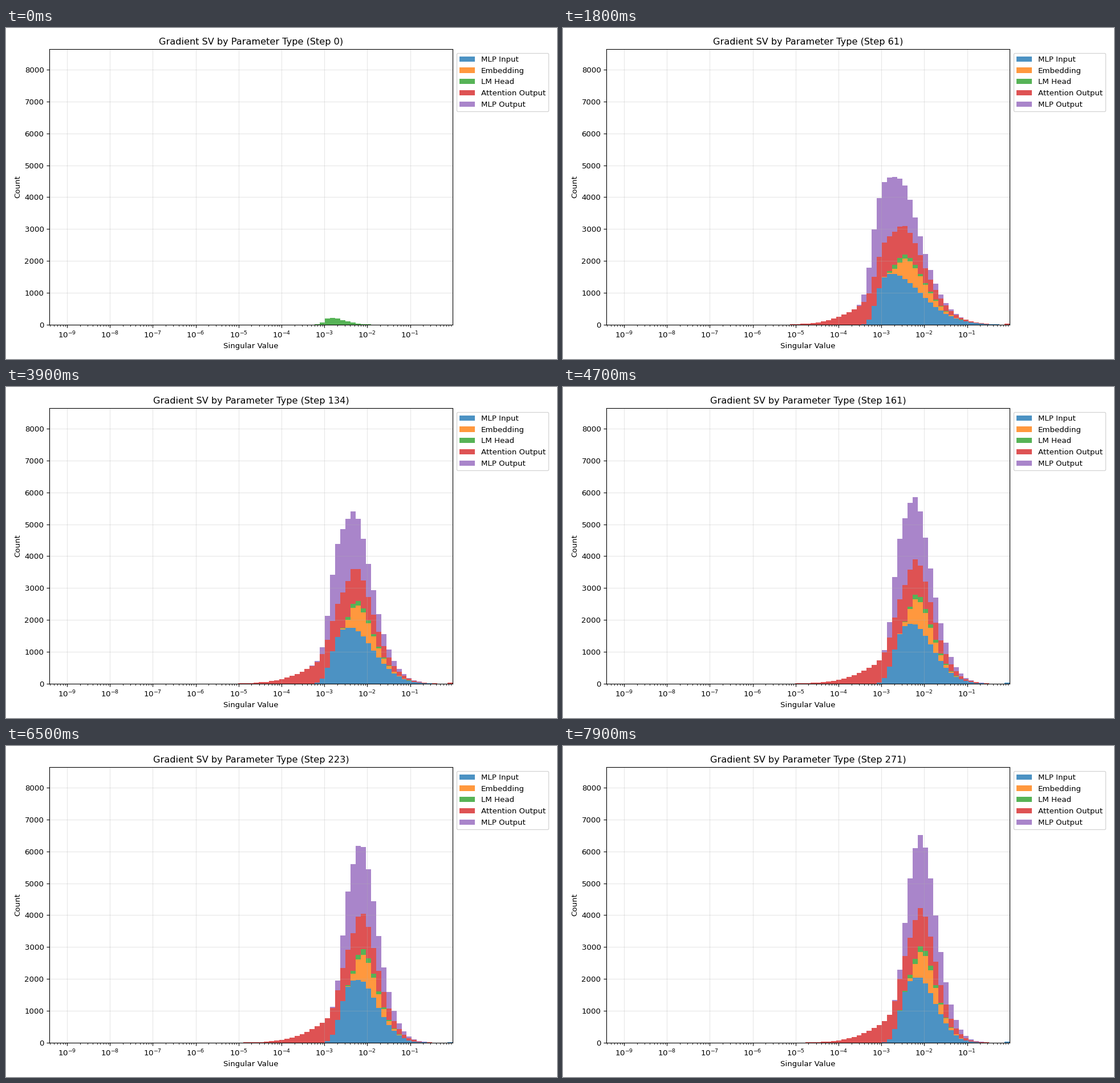
Recreate the animation shown at these times as a matplotlib script. Size 966x580 px, loop 8000 ms.

```python
import numpy as np
import matplotlib.pyplot as plt
from matplotlib.animation import FuncAnimation

W, H, DPI = 966, 580, 100
SCALE = 0.966  # a 10 x 6 inch layout, shrunk to the stage
FRAMES, INTERVAL = 80, 100
STEPS_PER_FRAME = 3.436
BINS = 79
RIGHT_POWER = 1.8
EARLY_DRIFT = 3.65  # bins per e-fold of time while the gradients first grow

plt.rcParams.update({
    "font.size": 10 * SCALE,
    "axes.titlepad": 6 * SCALE,
    "axes.labelpad": 4 * SCALE,
    "xtick.major.size": 3.5 * SCALE,
    "ytick.major.size": 3.5 * SCALE,
    "xtick.major.pad": 3.5 * SCALE,
    "ytick.major.pad": 3.5 * SCALE,
})


class Layer:
    """A lopsided bell: peak bin, height and the two widths follow key times."""

    def __init__(self, label, color, left_power, peak, height, left, right,
                 times=(8, 18, 31, 47, 79)):
        self.label, self.color, self.left_power = label, color, left_power
        self.times = times
        self.params = peak, height, left, right

    def counts(self, i):
        first = self.times[0]
        if i == 0 < first:
            return np.zeros(BINS)
        peak, height, left, right = (np.interp(i, self.times, p) for p in self.params)
        if i < first:
            peak += EARLY_DRIFT * np.log(i / first)
        d = np.arange(BINS) - peak
        fall = np.where(d < 0, np.abs(d / left) ** self.left_power,
                        np.abs(d / right) ** RIGHT_POWER)
        return np.round(height * np.exp(-fall))


LAYERS = [
    Layer("MLP Input", "tab:blue", 3.3,
          peak=(53.4, 55.6, 57.6, 59.6, 60.7),
          height=(1550, 1600, 1650, 1880, 2050),
          left=(4.7, 3.6, 4.3, 4.3, 4.1),
          right=(7.2, 8.2, 7.1, 5.5, 4.75)),
    Layer("Embedding", "tab:orange", 2.6,
          peak=(57, 58.8, 59.7, 60.8, 61.7),
          height=(430, 680, 775, 845, 870),
          left=(5, 2.4, 2, 2.2, 1.95),
          right=(6.1, 4.6, 4, 3.3, 3.2)),
    Layer("LM Head", "tab:green", 2.6, times=(0, 8, 18, 31, 47, 79),
          peak=(54.8, 55, 56.8, 59, 60.5, 61.2),
          height=(215, 152, 140, 132, 153, 180),
          left=(1.8, 2.2, 2, 2.6, 1.7, 2.7),
          right=(3.8, 4.5, 5.6, 4, 4.4, 3.5)),
    Layer("Attention Output", "tab:red", 1.7,
          peak=(51.5, 54.8, 57, 58.8, 60.3),
          height=(1130, 1085, 1095, 1165, 1220),
          left=(7.5, 7.8, 8.4, 8.6, 8.4),
          right=(7.45, 8, 7, 6.1, 5.4)),
    Layer("MLP Output", "tab:purple", 3.3,
          peak=(52.2, 54.2, 56.3, 58.7, 61),
          height=(1890, 1900, 1870, 2110, 2300),
          left=(3.7, 3.35, 3.75, 3.3, 3.2),
          right=(5.95, 6.3, 6, 5.3, 4.55)),
]


def all_counts(i):
    counts = np.array([layer.counts(i) for layer in LAYERS])
    if i > 0:  # a few outliers gather in the last bin
        rng = np.random.default_rng(i)
        counts[rng.choice([0, 1, 3]), -1] += rng.integers(12, 40)
    return counts


fig = plt.figure(figsize=(W / DPI, H / DPI), dpi=DPI)
ax = fig.add_axes([76 / W, 60 / H, 707 / W, 483 / H])
edges = np.logspace(-9.412, -0.0093, BINS + 1)
flat = np.zeros(BINS)
stacks = [ax.stairs(flat, edges, baseline=flat, fill=True, color=layer.color,
                    alpha=0.8, label=layer.label)
          for layer in LAYERS]
ax.set_xscale("log")
ax.set_xlim(edges[0], edges[-1])
ax.set_ylim(0, 8644)
ax.set_xlabel("Singular Value")
ax.set_ylabel("Count")
ax.grid(True, alpha=0.3)
ax.legend(loc="upper left", bbox_to_anchor=(1, 1))
title = ax.set_title("")


def update(i):
    base = np.zeros(BINS)
    for patch, counts in zip(stacks, all_counts(i)):
        top = base + counts
        patch.set_data(values=top, baseline=base)
        base = top
    title.set_text(f"Gradient SV by Parameter Type (Step {int(i * STEPS_PER_FRAME)})")
    return [*stacks, title]


anim = FuncAnimation(fig, update, frames=FRAMES, interval=INTERVAL, repeat=True)
plt.show()
```
